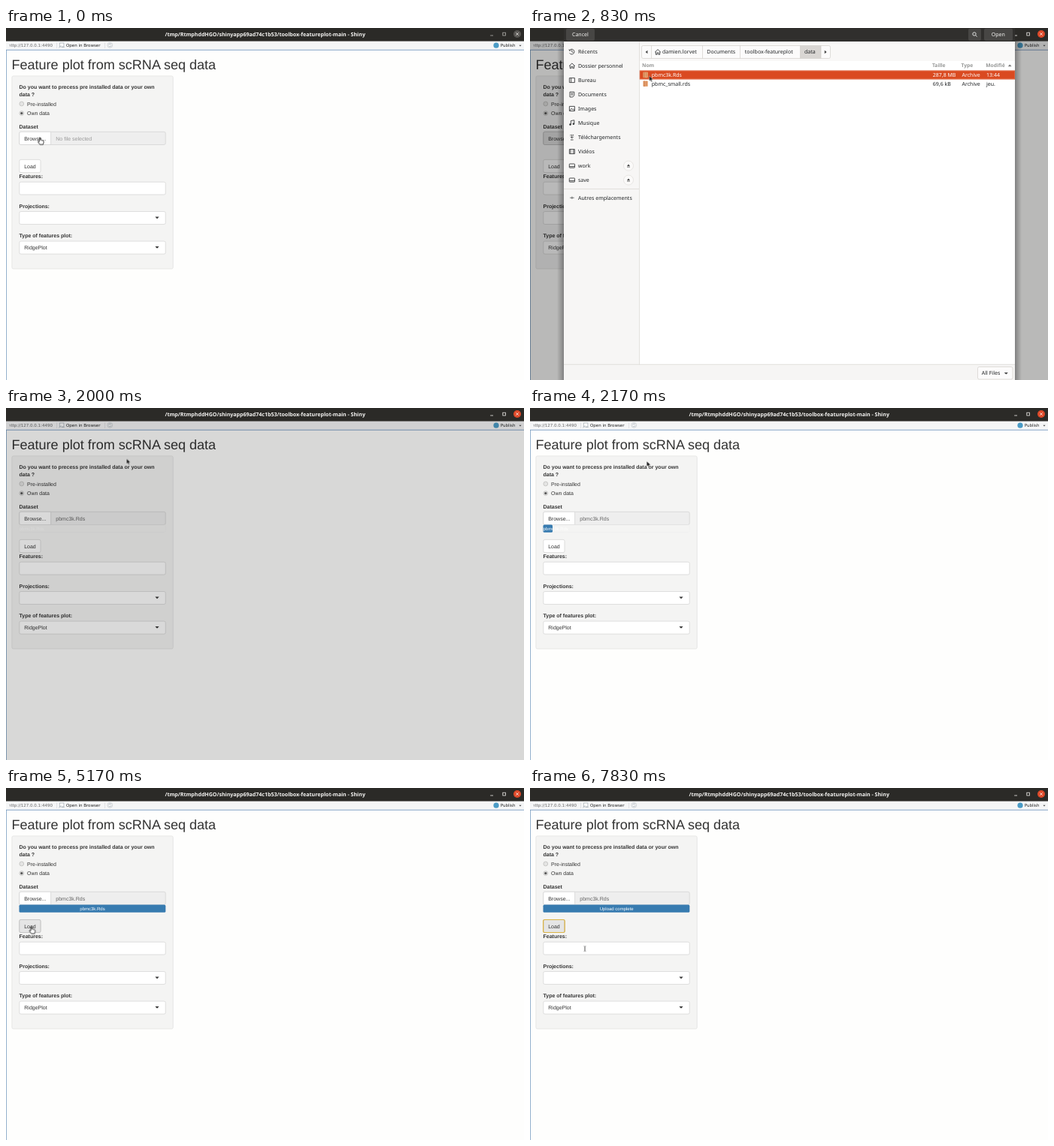
These frames come from a looping animation (689 by 469 pixels, 8 s). An HTML page:

```html
<!DOCTYPE html>
<html lang="en">
<head>
<meta charset="utf-8">
<title>Feature plot upload</title>
<style>
html, body { margin: 0; width: 100%; height: 100%; overflow: hidden; background: #fefefd; }
svg { display: block; width: 689px; height: 469px; }
text { text-rendering: geometricPrecision; white-space: pre; }

.page { font: 7px "Liberation Sans", Arial, sans-serif; fill: #333; }
.page .b { font-weight: 700; }
.page .head { font-size: 18.05px; }
.tool { font: 5.5px "DejaVu Sans", sans-serif; fill: #222; }
.ui { font: 500 7px "Noto Sans", sans-serif; fill: #1f2224; }
.title { font: 700 7.05px "Noto Sans", sans-serif; fill: #f6f5f3; }
.field { fill: #fff; stroke: #ccc; stroke-width: .6; }
.line { fill: none; stroke: #3a3d3e; stroke-width: .9; }
.cell { fill: none; stroke: #cdc9c4; stroke-width: .6; }
.small { font-size: 6px; fill: #fff; }

/* every change is a hard cut on one shared 8 s clock */
.a { animation: 8s step-end infinite; }
.idle { animation-name: idle; }
.lit { animation-name: lit; }
.dialog { animation-name: dialog; }
.dim { animation-name: dim; }
.before { animation-name: before; }
.after { animation-name: after; }
.bar { animation-name: bar; }
.name { animation-name: name; }
.done { animation-name: done; }
.hover { animation-name: hover; }
.focus { animation-name: focus; }
.move { animation-name: move; }
.hand { animation-name: hand; }
.arrow { animation-name: arrow; }
.beam { animation-name: beam; }

@keyframes idle { 0% { opacity: 1 } 4.125%, 100% { opacity: 0 } }
@keyframes lit { 0% { opacity: 0 } 4.125%, 100% { opacity: 1 } }
@keyframes dialog { 0% { opacity: 0 } 4.125% { opacity: 1 } 25%, 100% { opacity: 0 } }
@keyframes dim {
  0% { opacity: 0 } 4.125% { opacity: .04 } 6.25% { opacity: .13 } 8.375% { opacity: .225 }
  10.375% { opacity: .275 } 25% { opacity: .148 } 27.125%, 100% { opacity: 0 }
}
@keyframes before { 0% { opacity: 1 } 25%, 100% { opacity: 0 } }
@keyframes after { 0% { opacity: 0 } 25%, 100% { opacity: 1 } }
@keyframes bar {
  0% { width: 0 } 27.125% { width: 12.5px } 29.125% { width: 44px } 31.25% { width: 76px }
  33.375% { width: 108px } 35.375% { width: 140px } 37.5% { width: 172px } 39.625%, 100% { width: 194.8px }
}
@keyframes name {
  0% { opacity: 0; transform: translateX(17.5px) }
  25% { opacity: 1; transform: translateX(17.5px) }
  29.125% { opacity: 1; transform: translateX(22.8px) }
  31.25% { opacity: 1; transform: translateX(38.8px) }
  33.375% { opacity: 1; transform: translateX(54.8px) }
  35.375% { opacity: 1; transform: translateX(70.8px) }
  37.5% { opacity: 1; transform: translateX(86.8px) }
  39.625% { opacity: 1; transform: translateX(98.3px) }
  77.125%, 100% { opacity: 0; transform: translateX(98.3px) }
}
@keyframes done { 0% { opacity: 0 } 77.125%, 100% { opacity: 1 } }
@keyframes hover { 0% { opacity: 0 } 37.5%, 100% { opacity: 1 } }
@keyframes focus { 0% { opacity: 0 } 81.25%, 100% { opacity: 1 } }
@keyframes move {
  0% { transform: translate(42px, 145.5px) }
  4.125% { transform: translate(58px, 135px) }
  6.25% { transform: translate(110px, 100px) }
  8.375% { transform: translate(150px, 72px) }
  10.375% { transform: translate(158.6px, 63.8px) }
  18.75% { transform: translate(159.4px, 65.2px) }
  22.875% { transform: translate(160.4px, 67.6px) }
  27.125% { transform: translate(155.3px, 71px) }
  29.125% { transform: translate(138px, 92px) }
  31.25% { transform: translate(106px, 127px) }
  33.375% { transform: translate(80px, 152px) }
  35.375% { transform: translate(55px, 172px) }
  37.5% { transform: translate(36px, 182px) }
  39.625% { transform: translate(32.5px, 183px) }
  43.75% { transform: translate(32.8px, 183.2px) }
  47.875% { transform: translate(32.3px, 183.5px) }
  64.625% { transform: translate(30.6px, 184.3px) }
  68.75% { transform: translate(31px, 185px) }
  85.375% { transform: translate(40px, 195px) }
  87.5% { transform: translate(56px, 208px) }
  89.625% { transform: translate(66px, 217px) }
  91.625% { transform: translate(72px, 219px) }
  93.75% { transform: translate(73px, 217px) }
  97.875%, 100% { transform: translate(73px, 214.2px) }
}
@keyframes hand { 0% { opacity: 1 } 4.125% { opacity: 0 } 37.5% { opacity: 1 } 85.375%, 100% { opacity: 0 } }
@keyframes arrow { 0% { opacity: 0 } 4.125% { opacity: 1 } 37.5% { opacity: 0 } 85.375% { opacity: 1 } 87.5%, 100% { opacity: 0 } }
@keyframes beam { 0% { opacity: 0 } 87.5%, 100% { opacity: 1 } }
</style>
</head>
<body>
<svg viewBox="0 0 689 469">
  <defs>
    <path id="caret" d="M-2.6-1.3H2.6L0 1.4Z"/>
    <g id="drive" class="line"><rect x="-3.6" y="-2.6" width="7.2" height="5.2" rx=".6"/><path d="M-3.6 1H3.6"/></g>
    <g id="eject"><circle r="6.5" fill="#fbfaf9" stroke="#dcd9d5" stroke-width=".6"/><path d="M-2 .5L0-2L2 .5ZM-2 1.2H2V2H-2Z" fill="#444"/></g>
    <g id="file"><rect x="-3.2" y="-3.8" width="6.4" height="7.6" rx=".8" fill="#e9a777"/><path d="M-1.6-3.8V3.8M.2-2.4H2M.2-.4H2M.2 1.6H2" fill="none" stroke="#b9622f" stroke-width=".7"/></g>
    <g id="home" class="line"><path d="M-3.8.2L0-3.4L3.8.2M-2.7-.5V3.3H-.9V.9H.9V3.3H2.7V-.5"/></g>
    <linearGradient id="shade"><stop stop-opacity="0"/><stop offset="1" stop-opacity=".3"/></linearGradient>
    <rect id="shadow" x="-9" y="17" width="9" height="452" fill="url(#shade)"/>
  </defs>

  <!-- web page -->
  <rect width="689" height="469" fill="#fefefd"/>
  <rect y="17" width="689" height="12" fill="#f5f6f7"/>
  <g class="tool">
    <text x="3" y="25" fill="#666">http://127.0.0.1:4490</text>
    <rect x="2" y="18" width="2.4" height="10" fill="#f5f6f7"/>
    <path d="M67.5 19.5V27M131.5 19.5V27" stroke="#d4d6d8" stroke-width=".6"/>
    <g fill="none" stroke="#a4acb3" stroke-width=".7">
      <rect x="71.3" y="20" width="5.6" height="5" fill="#fff"/>
      <path d="M70.3 26.3L73.6 23.2M77.8 25.5H74"/>
      <circle cx="138.3" cy="22.8" r="3.4" stroke="#c2c7cc"/>
      <path d="M136.6 22.6A1.8 1.8 0 0 1 140 22M140 23.2A1.8 1.8 0 0 1 136.6 23.8"/>
    </g>
    <text x="80" y="25">Open in Browser</text>
    <circle cx="652" cy="23.2" r="3.6" fill="#4b9cc6"/>
    <text x="657.8" y="25">Publish</text>
    <use href="#caret" transform="translate(684 23.6) scale(.6)" fill="#444"/>
  </g>
  <path d="M0 29.3H689M.4 29V469" fill="none" stroke="#7b9dc2" stroke-width=".9"/>

  <g class="page">
    <text class="head" x="7.5" y="55">Feature plot from scRNA seq data</text>
    <rect x="7.9" y="63.9" width="214.3" height="257" rx="2" fill="#f4f4f3" stroke="#e0e0df" stroke-width=".7"/>
    <g class="b">
      <text x="17.5" y="81">Do you want to precess pre installed data or your own</text>
      <text x="17.5" y="91">data ?</text>
      <text x="17.5" y="133.5">Dataset</text>
      <text x="17.5" y="200">Features:</text>
      <text x="17.5" y="239.6">Projections:</text>
      <text x="17.5" y="279.1">Type of features plot:</text>
    </g>
    <g fill="#e4e4e3" stroke="#b4b4b3" stroke-width=".6">
      <circle cx="20.8" cy="101" r="2.9"/>
      <circle cx="20.8" cy="113.6" r="2.9"/>
    </g>
    <circle cx="20.8" cy="113.6" r="1.6" fill="#555"/>
    <text x="28" y="103.5">Pre-installed</text>
    <text x="28" y="116.1">Own data</text>

    <rect x="17.8" y="138.3" width="194.4" height="17.2" rx="2" fill="#eee" stroke="#ccc" stroke-width=".6"/>
    <path class="field" d="M59.6 138.3H19.8a2 2 0 0 0-2 2V153.5a2 2 0 0 0 2 2H59.6Z"/>
    <path class="a dialog" d="M59.6 138.3H19.8a2 2 0 0 0-2 2V153.5a2 2 0 0 0 2 2H59.6Z" fill="#e0e0e0" stroke="#adadad" stroke-width=".6"/>
    <text x="24.2" y="149.5">Browse...</text>
    <text class="a before" x="66.3" y="149.5" fill="#999">No file selected</text>
    <text class="a after" x="66.3" y="149.5" fill="#666">pbmc3k.Rds</text>

    <rect class="a after" x="17.6" y="155.7" width="194.6" height="10" rx="1.8" fill="#f4f4f3" stroke="#ededec" stroke-width=".4"/>
    <rect class="a bar" x="17.5" y="155.6" width="0" height="10.2" rx="1.6" fill="#377bb0"/>
    <text class="a name small" y="162.7">pbmc3k.Rds</text>
    <text class="a done small" x="115.2" y="162.7" text-anchor="middle">Upload complete</text>

    <rect class="field" x="17.8" y="175.4" width="28.2" height="17.2" rx="2"/>
    <rect class="a hover" x="17.8" y="175.4" width="28.2" height="17.2" rx="2" fill="#e5e5e5" stroke="#adadad" stroke-width=".6"/>
    <rect class="a focus" x="17.6" y="175.5" width="28.6" height="17" rx="1.8" fill="none" stroke="#dcb443" stroke-width="1.2"/>
    <text x="24.2" y="186.5">Load</text>

    <g class="field">
      <rect x="17.8" y="205.2" width="194.4" height="16.8" rx="2"/>
      <rect x="17.8" y="244.5" width="194.4" height="17" rx="2"/>
      <rect x="17.8" y="284.1" width="194.4" height="17" rx="2"/>
    </g>
    <use href="#caret" x="201" y="252.9"/>
    <use href="#caret" x="201" y="292.4"/>
    <text x="24.3" y="295.1">RidgePlot</text>
  </g>

  <rect class="a dim" y="17" width="689" height="452" opacity="0"/>

  <!-- window bar -->
  <rect width="689" height="17.6" fill="#2b2a27"/>
  <text class="title" x="344.7" y="11" text-anchor="middle">/tmp/RtmphddHGO/shinyapp69ad74c1b53/toolbox-featureplot-main - Shiny</text>
  <g fill="none" stroke-width=".8">
    <g class="a idle" stroke="#b5b3b0">
      <path d="M644.2 10H648"/><rect x="660.8" y="6.2" width="3.8" height="3.8"/>
      <circle cx="680" cy="8" r="5" fill="#595754" stroke="none"/><path d="M678.2 6.2L681.8 9.8M681.8 6.2L678.2 9.8" stroke="#e4e2df"/>
    </g>
    <g class="a lit" stroke="#f0eeeb">
      <path d="M644.2 10H648"/><rect x="660.8" y="6.2" width="3.8" height="3.8"/>
      <circle cx="680" cy="8" r="5" fill="#df4a2a" stroke="none"/><path d="M678.2 6.2L681.8 9.8M681.8 6.2L678.2 9.8"/>
    </g>
  </g>

  <!-- file chooser -->
  <g class="a dialog ui" opacity="0">
    <use href="#shadow" x="45"/>
    <use href="#shadow" transform="translate(645) scale(-1 1)"/>
    <rect x="45" width="600" height="469" fill="#fff"/>
    <rect x="45" width="600" height="18" fill="#302f2d"/>
    <g fill="#474644">
      <rect x="48" y=".8" width="38" height="16" rx="2"/>
      <rect x="583" y=".8" width="17" height="16" rx="2"/>
      <rect x="604" y=".8" width="38" height="16" rx="2"/>
    </g>
    <g fill="#f6f5f3">
      <text x="56" y="11">Cancel</text>
      <text x="613.8" y="11">Open</text>
    </g>
    <path d="M592.6 9.6L594.6 11.6M593.2 8A2.2 2.2 0 1 1 588.8 8A2.2 2.2 0 1 1 593.2 8" fill="none" stroke="#eee" stroke-width=".9"/>

    <rect x="45" y="18" width="100.5" height="430.5" fill="#f7f6f5"/>
    <rect x="145.5" y="18" width="499.5" height="26" fill="#f9f8f7"/>
    <rect x="45" y="448.3" width="600" height="20.7" fill="#f6f5f4"/>
    <path d="M145.5 18V448.3M45 448.3H645M45 214.5H145" stroke="#d9d6d2" stroke-width=".7"/>

    <text x="64" y="34">Récents</text>
    <text x="64" y="53">Dossier personnel</text>
    <text x="64" y="72">Bureau</text>
    <text x="64" y="91">Documents</text>
    <text x="64" y="110">Images</text>
    <text x="64" y="129">Musique</text>
    <text x="64" y="148">Téléchargements</text>
    <text x="64" y="167">Vidéos</text>
    <text x="64" y="186">work</text>
    <text x="64" y="205">save</text>
    <text x="64" y="228.6">Autres emplacements</text>
    <g class="line">
      <path d="M52.6 29.8A3.4 3.4 0 1 1 52.6 33.4M55.8 29.4V31.8L57.4 32.6M52 28.4L52.5 30.3L54.4 29.8"/>
      <path d="M52.4 66.6H59.4V72.6H52.4ZM54.6 66.6V72.6"/>
      <path d="M53 85.2H58.8V89.8L56.8 92H53ZM54.4 87.2H57.4M54.4 89H57.4"/>
      <path d="M52.4 104.4H59.4V110.6H52.4ZM53 110L55.2 107.2L56.6 108.8L57.6 107.8L59.2 110"/>
      <path d="M54.4 128.6V123.6L58.8 122.8V127.8"/>
      <path d="M55.8 141.8V146.6M53.8 144.8L55.8 146.8L57.8 144.8M54 149H57.6M54 142V143.4M57.6 142V143.4"/>
      <path d="M52.4 161.6H59.4V167.6H52.4ZM54 161.6V167.6M57.8 161.6V167.6"/>
      <path d="M53.1 226.2H58.7M55.9 224.6V227.8" stroke-width=".7"/>
    </g>
    <g fill="#3a3d3e"><circle cx="53.5" cy="128.6" r="1.3"/><circle cx="57.9" cy="127.8" r="1.3"/></g>
    <use href="#home" x="55.9" y="50.4"/>
    <use href="#drive" x="55.9" y="183.6"/>
    <use href="#drive" x="55.9" y="202.6"/>
    <use href="#eject" x="131" y="183.6"/>
    <use href="#eject" x="131" y="202.6"/>

    <rect x="148.5" y="23.5" width="251" height="17" rx="2" fill="#fcfbfb"/>
    <rect x="359.5" y="23.5" width="27.5" height="17" fill="#d9d6d3"/>
    <rect class="cell" x="148.5" y="23.5" width="251" height="17" rx="2"/>
    <path class="cell" d="M161.5 23.5V40.5M229.5 23.5V40.5M279.5 23.5V40.5M359.5 23.5V40.5M387 23.5V40.5"/>
    <path d="M156.4 29.8V34.2L153.6 32ZM391.8 29.8V34.2L394.6 32Z" fill="#444"/>
    <use href="#home" x="170" y="32"/>
    <text x="176" y="34.4">damien.lorvet</text>
    <text x="235.3" y="34.4">Documents</text>
    <text x="285.8" y="34.4">toolbox-featureplot</text>
    <text x="365" y="34.4">data</text>

    <g font-weight="700" font-size="6.7" fill="#969796">
      <text x="149" y="52.4">Nom</text>
      <text x="535" y="52.4">Taille</text>
      <text x="573.5" y="52.4">Type</text>
      <text x="606.3" y="52.4">Modifié</text>
    </g>
    <path d="M635.8 51.2H640.6L638.2 48.6Z" fill="#777"/>
    <rect x="145.8" y="56.5" width="499.2" height="12" fill="#da4a20"/>
    <rect x="146.4" y="57.2" width="498" height="10.6" fill="none" stroke="#fff" stroke-opacity=".25" stroke-width=".5"/>
    <use href="#file" x="153.6" y="62.5"/>
    <use href="#file" x="153.6" y="74.2"/>
    <g fill="#fff">
      <text x="161.8" y="65">pbmc3k.Rds</text>
      <text x="535.8" y="65">287,8 MB</text>
      <text x="574.5" y="65">Archive</text>
      <text x="607" y="65">13:44</text>
    </g>
    <text x="161.8" y="76.8">pbmc_small.rds</text>
    <text x="535.8" y="76.8">69,6 kB</text>
    <text x="574.5" y="76.8">Archive</text>
    <text x="607" y="76.8">jeu.</text>

    <rect x="595.5" y="451.5" width="46.5" height="16.5" rx="2" fill="#fcfbfb" stroke="#cdc9c4" stroke-width=".6"/>
    <text x="600.8" y="462.3">All Files</text>
    <use href="#caret" x="633.3" y="460.2" fill="#444"/>
  </g>

  <!-- pointer -->
  <g class="a move" stroke-linejoin="round">
    <path class="a hand" d="M2.2.9Q3-.1 3.7.9V3.8Q4.6 3.3 5.2 4.1Q6.2 3.6 6.7 4.5Q8 4.2 8.1 5.5V7.4L7.3 9.8H3.1L.5 6.3Q.4 5.2 1.4 5.5L2.2 6.2Z" fill="#fff" stroke="#222" stroke-width=".9"/>
    <path class="a arrow" d="M0 0V6.8L1.6 5.4L2.8 8L4 7.4L2.9 4.9L5 4.7Z" fill="#1c1c1c" stroke="#eee" stroke-width=".4"/>
    <path class="a beam" d="M-1.5-3.4Q0-3.4 0-2.6V2.6Q0 3.4-1.5 3.4M1.5-3.4Q0-3.4 0-2.6V2.6Q0 3.4 1.5 3.4" fill="none" stroke="#555" stroke-width=".6"/>
  </g>
</svg>
</body>
</html>
```
